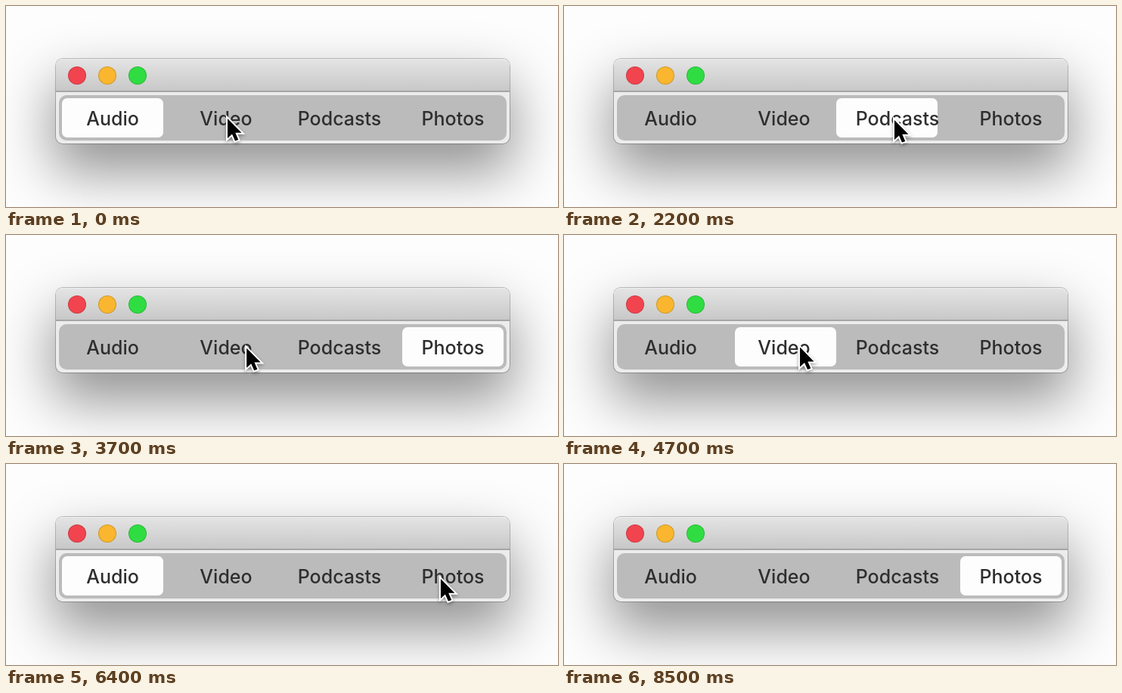
These frames come from a looping animation (730 px wide and 266 px high, 9.1 s). An HTML page:

```html
<!DOCTYPE html>
<html lang="en">
<head>
<meta charset="utf-8">
<style>
  html, body { margin: 0; width: 100%; height: 100%; overflow: hidden; background: #fdfdfd; }
  .window {
    position: absolute; left: 66px; top: 70px; width: 600px; height: 112px;
    border-radius: 9px; background: #ececec;
    box-shadow: 0 0 0 1px rgba(0, 0, 0, .24), 0 34px 72px 4px rgba(0, 0, 0, .42);
  }
  .titlebar {
    height: 42px; border-radius: 9px 9px 0 0; border-bottom: 2px solid #a6a6a6;
    background: linear-gradient(#e4e4e4, #c8c8c8);
    box-shadow: inset 0 1px #f0f0f0;
  }
  .light {
    position: absolute; top: 10px; width: 24px; height: 24px;
    box-sizing: border-box; border-radius: 50%; border: 1px solid rgba(0, 0, 0, .16);
  }
  .track {
    position: absolute; left: 70px; top: 118px; width: 592px; height: 60px;
    border-radius: 10px; background: #bbb;
  }
  .pill, .label { position: absolute; top: 122px; width: 134px; height: 52px; }
  .pill { left: 0; border-radius: 7px; background: #fdfdfd; }
  .label {
    display: flex; justify-content: center; white-space: nowrap;
    font: 500 25px/54px Inter, sans-serif; color: #2e2e2e;
  }
  svg { position: absolute; left: 0; top: 0; overflow: visible; filter: drop-shadow(0 2px 2px rgba(0, 0, 0, .35)); }
</style>
</head>
<body>
<div class="window">
  <div class="titlebar"></div>
  <div class="light" style="left:16px;background:#f2444f"></div>
  <div class="light" style="left:56px;background:#f9b62e"></div>
  <div class="light" style="left:96px;background:#2fdd42"></div>
</div>
<div class="track"></div>
<div class="pill"></div>
<svg id="cursor" width="24" height="36">
  <path d="M0 0V26L6 20.5L10 29.5L14.3 28L10.3 18.8H18.5Z" fill="#000" stroke="#fff" stroke-width="4" paint-order="stroke"/>
</svg>
<script>
const LOOP = 9100, PILL_DECAY = 122, CURSOR_GONE = 7850, ARC = 32;
const slotX = i => 74 + 150 * i;

// Where the cursor rests: when it sets off, when it arrives, and what it clicks there.
const stops = [
  { leave: 0, arrive: 0, x: 293, y: 149, click: 40, slot: 1 },
  { leave: 700, arrive: 1700, x: 437, y: 151, click: 1911, slot: 2 },
  { leave: 2270, arrive: 2800, x: 615, y: 152, click: 2914, slot: 3 },
  { leave: 3350, arrive: 3900, x: 313, y: 148, click: 4089, slot: 1 },
  { leave: 4700, arrive: 5400, x: 149, y: 149, click: 5614, slot: 0 },
  { leave: 5740, arrive: 6500, x: 575, y: 152, click: 6814, slot: 3 },
  { leave: 7650, arrive: 7950, x: 715, y: 169 }
];

const pill = document.querySelector('.pill');
const cursor = document.getElementById('cursor');

['Audio', 'Video', 'Podcasts', 'Photos'].forEach((text, i) => {
  const label = document.createElement('div');
  label.className = 'label';
  label.textContent = text;
  label.style.left = slotX(i) + 'px';
  cursor.before(label);
});

const easeOut = u => 1 - (1 - u) ** 4;
const mix = (a, b, p) => a + (b - a) * p;

// Each click pulls the pill to its slot with exponential decay.
function pillX(t) {
  let x = slotX(0);
  stops.forEach(({ click, slot }, i) => {
    if (!(t >= click)) return;
    const end = Math.min(t, stops[i + 1].click ?? t);
    x = mix(slotX(slot), x, Math.exp((click - end) / PILL_DECAY));
  });
  return Math.round(x);
}

// The cursor flicks from stop to stop along a shallow downward arc.
function cursorAt(t) {
  const i = stops.findLastIndex(stop => t >= stop.leave);
  const to = stops[i], from = stops[Math.max(0, i - 1)];
  const p = t < to.arrive ? easeOut((t - to.leave) / (to.arrive - to.leave)) : 1;
  return [mix(from.x, to.x, p), mix(from.y, to.y, p) + ARC * Math.sin(Math.PI * p)];
}

function draw(t) {
  const [x, y] = cursorAt(t);
  pill.style.transform = `translateX(${pillX(t)}px)`;
  cursor.style.transform = `translate(${x}px, ${y}px)`;
  cursor.style.visibility = t < CURSOR_GONE ? 'visible' : 'hidden';
}

const begin = performance.now();
function tick() {
  draw((performance.now() - begin) % LOOP);
  requestAnimationFrame(tick);
}
tick();
</script>
</body>
</html>
```
